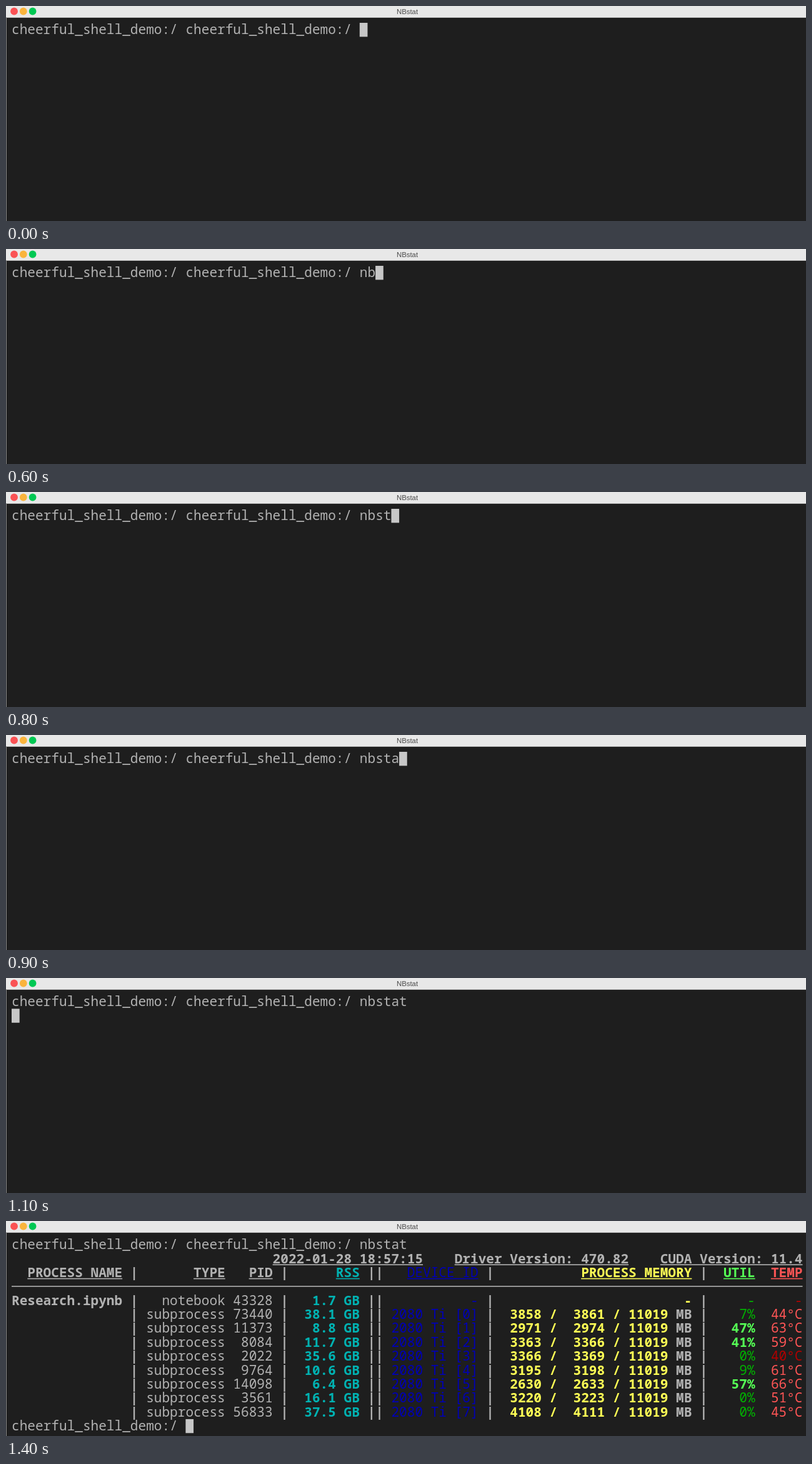
Animation of 1280 by 345 pixels, one loop 8 s. Source, as an HTML page with a canvas:

```html
<!DOCTYPE html>
<html lang="en">
<head>
<meta charset="utf-8">
<title>NBstat</title>
<style>
  html, body { margin: 0; width: 100%; height: 100%; overflow: hidden; background: #1e1e1e; }
  canvas { display: block; }
</style>
</head>
<body>
<canvas id="stage" width="1280" height="345"></canvas>
<script>
const ctx = document.getElementById('stage').getContext('2d');
const LOOP = 8000, CELL_W = 12.655, CELL_H = 22.38, LEFT = 9, TOP = 27;
const GRAY = '#b2b2b2', CYAN = '#00b2b2', BLUE = '#0000b4', YELLOW = '#ffff55',
      GREEN = '#00b200', LIME = '#55ff55', RED = '#b20000', PINK = '#ff5555';
const PROMPT = 'cheerful_shell_demo:/ ', COMMAND = 'nbstat';

// pid, memory, device memory, used memory, utilisation, temperature
const processes = [
  [73440, '38.1', 3858, 3861, 7, 44],
  [11373, '8.8', 2971, 2974, 47, 63],
  [8084, '11.7', 3363, 3366, 41, 59],
  [2022, '35.6', 3366, 3369, 0, 40],
  [9764, '10.6', 3195, 3198, 9, 61],
  [14098, '6.4', 2630, 2633, 57, 66],
  [3561, '16.1', 3220, 3223, 0, 51],
  [56833, '37.5', 4108, 4111, 0, 45]
];

const cellX = col => LEFT + col * CELL_W;
const cellY = row => TOP + row * CELL_H;

function rect(x, y, w, h, color) {
  ctx.fillStyle = color;
  ctx.fillRect(x, y, w, h);
}

function write(row, col, text, color = GRAY, bold = false) {
  ctx.font = `${bold ? 'bold ' : ''}21.09px "Noto Sans Mono", "DejaVu Sans Mono", monospace`;
  ctx.textAlign = 'left';
  ctx.fillStyle = color;
  [...text].forEach((ch, i) => ctx.fillText(ch, cellX(col + i), cellY(row) + 18.2));
}

// Right-aligned: the text stops before column `end`.
function writeEnd(row, end, text, color, bold) {
  write(row, end - String(text).length, String(text), color, bold);
}

function heading(row, end, text, color = GRAY, bold = true) {
  writeEnd(row, end, text, color, bold);
  rect(cellX(end - text.length), cellY(row) + 20, text.length * CELL_W, 1.6, color);
}

function cursor(row, col) {
  rect(cellX(col), cellY(row), CELL_W, CELL_H, '#c7c7c7');
}

function separators(row) {
  for (const col of [15, 34, 45, 46, 60, 87]) write(row, col, '|', GRAY, true);
}

function baseCells(row, type, pid, rss) {
  separators(row);
  writeEnd(row, 27, type);
  writeEnd(row, 33, pid);
  writeEnd(row, 44, rss + ' GB', CYAN, true);
}

function table() {
  heading(1, 52, '2022-01-28 18:57:15');
  heading(1, 78, 'Driver Version: 470.82');
  heading(1, 100, 'CUDA Version: 11.4');

  separators(2);
  heading(2, 14, 'PROCESS NAME');
  heading(2, 27, 'TYPE');
  heading(2, 33, 'PID');
  heading(2, 44, 'RSS', CYAN);
  heading(2, 59, 'DEVICE ID', BLUE, false);
  heading(2, 86, 'PROCESS MEMORY', YELLOW);
  heading(2, 94, 'UTIL', LIME);
  heading(2, 100, 'TEMP', PINK);
  rect(LEFT, 104, 100 * CELL_W, 1.6, GRAY);

  write(4, 0, 'Research.ipynb', GRAY, true);
  baseCells(4, 'notebook', 43328, '1.7');
  write(4, 58, '-', BLUE);
  write(4, 85, '-', YELLOW, true);
  write(4, 93, '-', GREEN);
  write(4, 99, '-', RED);

  processes.forEach(([pid, rss, own, used, util, temp], i) => {
    const row = 5 + i, busy = util > 30;
    baseCells(row, 'subprocess', pid, rss);
    write(row, 48, `2080 Ti [${i}]`, BLUE);
    write(row, 63, `${own} /  ${used} / 11019`, YELLOW, true);
    write(row, 84, 'MB', GRAY, true);
    writeEnd(row, 94, util + '%', busy ? LIME : GREEN, busy);
    writeEnd(row, 100, temp + '°C', temp > 40 ? PINK : RED);
  });
}

function titleBar() {
  rect(0, 0, 1280, 18, '#e8e8e8');
  rect(0, 18, 1280, 1, '#b4b4b4');
  rect(0, 18, 1, 327, '#8a8a8a');
  ['#fa5255', '#fab43c', '#00c853'].forEach((color, i) => {
    ctx.fillStyle = color;
    ctx.beginPath();
    ctx.arc(13 + i * 14.8, 8.5, 5.9, 0, Math.PI * 2);
    ctx.fill();
  });
  ctx.font = '11.4px "Liberation Sans", Arial, sans-serif';
  ctx.textAlign = 'center';
  ctx.fillStyle = '#4a4a4a';
  ctx.fillText('NBstat', 642, 12.7);
}

function draw(t) {
  rect(0, 0, 1280, 345, '#1e1e1e');
  titleBar();
  const typed = Math.max(0, Math.min(COMMAND.length, Math.floor(t / 100) - 4));
  const line = PROMPT + PROMPT + COMMAND.slice(0, typed);
  write(0, 0, line);
  if (t < 1100) cursor(0, line.length);
  else if (t < 1300) cursor(1, 0);
  else {
    table();
    const prompt = t < 1400 ? '' : PROMPT;
    write(13, 0, prompt);
    cursor(13, prompt.length);
  }
}

function tick() {
  draw(performance.now() % LOOP);
  requestAnimationFrame(tick);
}
tick();
</script>
</body>
</html>
```
